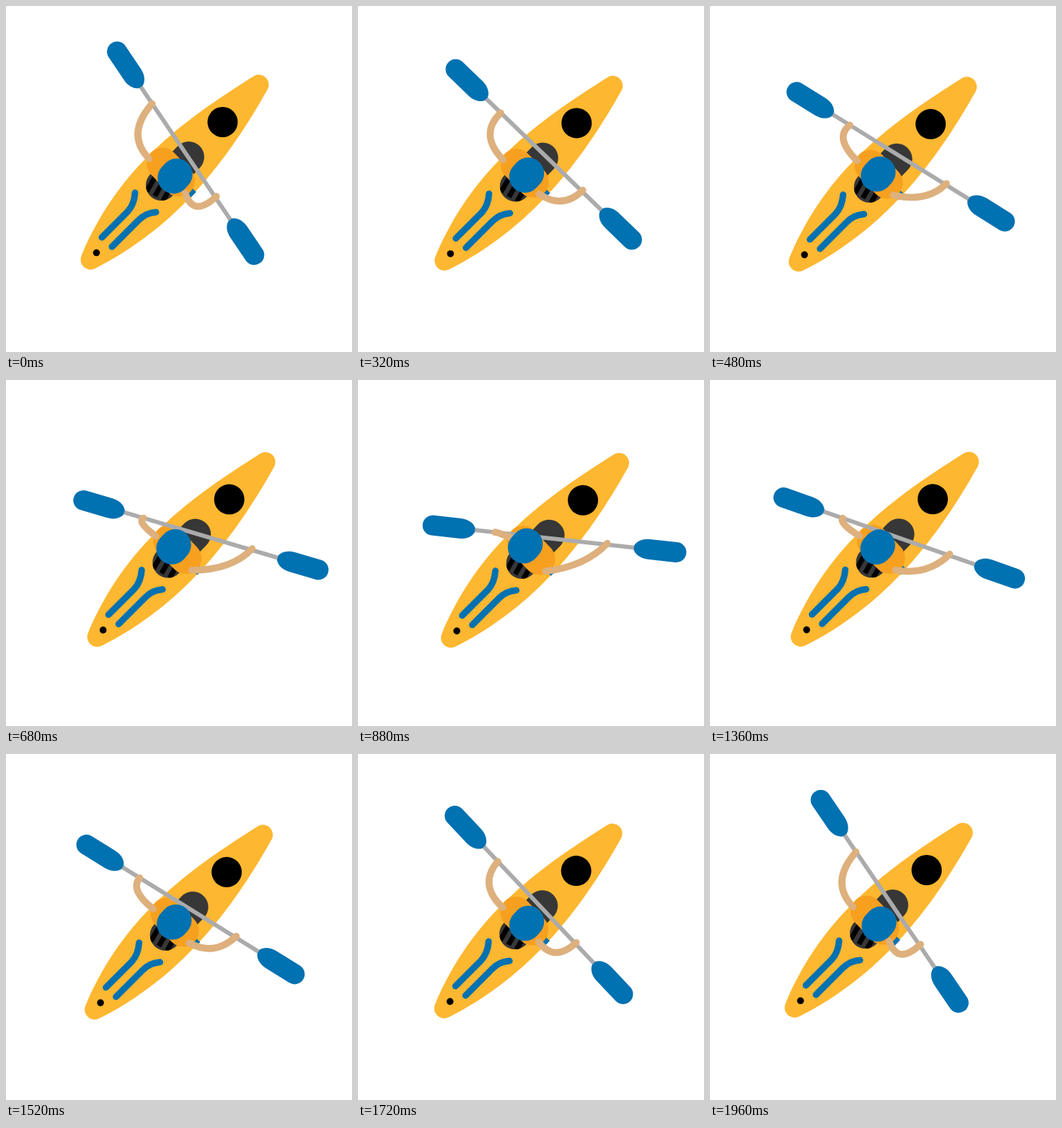
An HTML page for the animation above (2000 ms loop, 480 by 480 pixels).

```html
<!DOCTYPE html>
<html lang="en">
<head>
<meta charset="utf-8">
<title>Kayak</title>
<style>
  html, body { margin: 0; width: 100%; height: 100%; overflow: hidden; background: #fff; }
  svg { display: block; width: 100vw; height: 100vh; }
  .line { fill: none; stroke-linecap: round; }
  .blue { stroke: #0071b1; }
  .arm { stroke: #ddb07d; stroke-width: 9.5; }
</style>
</head>
<body>
<svg viewBox="0 0 480 480">
  <defs>
    <clipPath id="seat"><circle cx="215.5" cy="248.5" r="21.5"/></clipPath>
    <path id="blade" fill="#0071b1"
      d="M111-3C113-8 120-14 132-14H170A14 14 0 0 1 170 14H132C120 14 113 8 111 3Z"/>
  </defs>

  <g class="boat">
    <path fill="#fdb730" transform="translate(234 230.5) rotate(-46.1)"
      d="M-173-13C-48-61 60-41 173-13A13.8 13.8 0 0 1 173 13C62 42-55 55-173 13A13.8 13.8 0 0 1-173-13Z"/>
    <circle cx="125.5" cy="342.3" r="4.8"/>
    <circle cx="300.5" cy="161" r="21"/>
    <g class="line blue" stroke-width="9">
      <path d="M133 321L169 285Q178 275 179 259"/>
      <path d="M147 334L184 297Q194 287 208 286"/>
    </g>
    <path class="line" stroke="#373737" stroke-width="43" d="M215.500 248.500L253.500 209.500"/>
    <g clip-path="url(#seat)">
      <path stroke="#000" stroke-width="7" transform="translate(215 249) rotate(-60)"
        d="M-17-13H30M-17 0H30M-17 13H30"/>
    </g>
    <path class="blue" stroke-width="11" d="M203 206L260 262"/>
    <path class="line" stroke="#f7a01f" stroke-width="44" d="M217 218.500L240 242.500"/>
  </g>

  <g id="paddle">
    <path stroke="#ababab" stroke-width="5.8" d="M-114 0H114"/>
    <use href="#blade"/>
    <use href="#blade" transform="rotate(180)"/>
  </g>

  <path id="leftArm" class="line arm"/>
  <path id="rightArm" class="line arm"/>
  <path id="helmet" class="line blue" stroke-width="44" d="M-2.200 2.400L2.200-2.400"/>
</svg>
<script>
  const LOOP = 2000, STEP = 40;
  const $ = q => document.querySelector(q);
  const mix = (a, b, s) => a + (b - a) * s;
  const place = (q, x, y, turn = 0) =>
    $(q).setAttribute('transform', `translate(${x} ${y}) rotate(${turn})`);
  const arm = (q, ...points) => $(q).setAttribute('d', `M${points[0]}Q${points[1]} ${points[2]}`);

  function draw(ms) {
    const t = Math.floor(ms % LOOP / STEP) * STEP / LOOP;
    const s = (1 - Math.cos(2 * Math.PI * t)) / 2;

    // The paddle swings out on one arc and returns on the opposite one.
    const bow = 4 * s * (1 - s) * (t < 0.5 ? 1 : -1);
    const dx = 4.3 * bow, dy = -3.3 * bow;
    const px = mix(249.2, 272.8, s) + dx, py = mix(204.3, 221.4, s) + dy;
    const turn = mix(56, 4.5, s), rad = turn * Math.PI / 180;
    const grip = (x, y) => [
      px + x * Math.cos(rad) - y * Math.sin(rad),
      py + x * Math.sin(rad) + y * Math.cos(rad)
    ];

    const bx = 12 * s, by = 6 * s;
    place('.boat', bx, by);
    place('#paddle', px, py, turn);
    place('#helmet', mix(234.5, 232, s), mix(236, 230, s));
    arm('#leftArm', grip(-83, 0), [165.5 + 26 * s * s, 178 + 35 * s * s + dy], [198.5 + bx, 212 + by]);
    arm('#rightArm', grip(73.5, -2),
      [260 + 95 * s - 40 * s * s + 1.4 * dx, 294 - 36 * s + 1.2 * dy], [248.5 + bx, 259.5 + by]);
  }

  const start = performance.now();
  function tick() {
    draw(performance.now() - start);
    requestAnimationFrame(tick);
  }
  tick();
</script>
</body>
</html>
```
